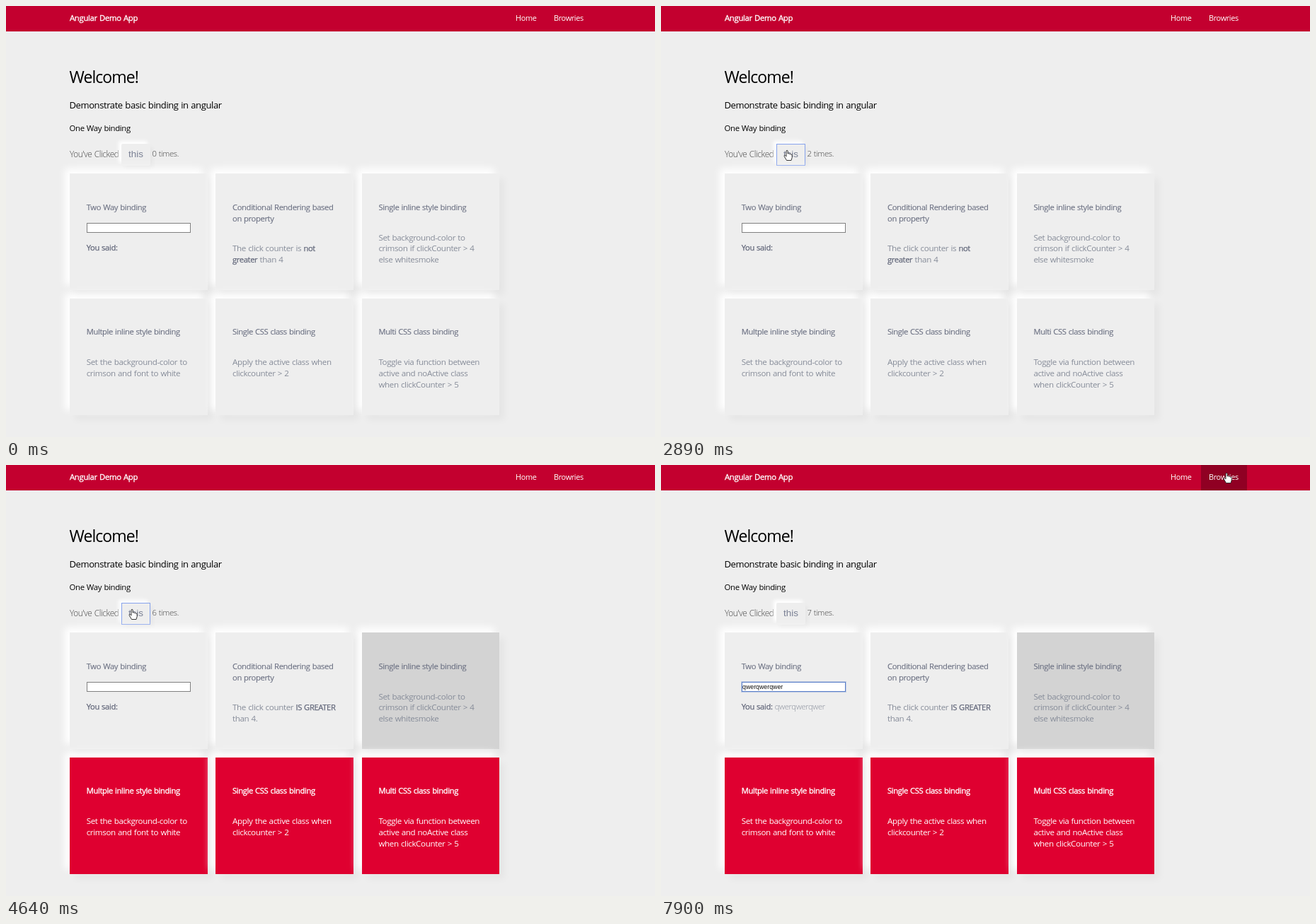
An HTML page for the animation above (8 s loop, 917x610 px).

```html
<!DOCTYPE html>
<html lang="en">
<head>
<meta charset="utf-8">
<title>Angular Demo App</title>
<style>
  html, body { margin: 0; width: 100%; height: 100%; overflow: hidden; background: #eee; }
  #stage {
    position: relative; width: 917px; height: 610px; overflow: hidden; background: #eee;
    font: 300 11.2px/16px "Open Sans", "Noto Sans", sans-serif;
    letter-spacing: -.031em; word-spacing: .05em; white-space: nowrap; color: #000;
  }
  #stage > *, .field, .said { position: absolute; }
  h1, h2, h3, h4, p { margin: 0; font-weight: 400; }
  h1, h2, h3, h4, p, b, span { letter-spacing: -.031em; word-spacing: .05em; }

  header { left: 0; top: 0; width: 917px; height: 36px; background: #c3002f; color: #fff; }
  header > * { position: absolute; top: 0; height: 27.3px; padding-top: 8.7px; font-weight: 400; }
  .brand { left: 90px; font-size: 11.4px; -webkit-text-stroke: .35px; }
  .home { left: 720px; font-size: 10.9px; }
  .link { left: 763px; width: 54px; padding-left: 11px; font-size: 10.9px; }
  .link.hover { background: #900023; }

  h1 { left: 89.5px; top: 92px; font-size: 23px; letter-spacing: -.04em; }
  h2 { left: 89.5px; top: 132.4px; font-size: 13px; }
  h3 { left: 89.5px; top: 164.6px; font-size: 11.4px; }
  .clicked { left: 90px; top: 200.7px; font-size: 11.8px; color: #444; }
  .times { left: 206.4px; top: 200.7px; font-size: 11.3px; color: #444; }
  .button {
    left: 163px; top: 195px; width: 41px; height: 31px; box-sizing: border-box; border-radius: 2px;
    font: 13.4px/30px Arial, "Liberation Sans", sans-serif; letter-spacing: 0;
    text-align: center; color: #7a8094; background: #eee;
    box-shadow: -4px -4px 5px #fff, 4px 4px 5px rgba(0,0,0,.03);
  }
  .button.focus { outline: 1px solid #86a2ec; outline-offset: -1px; border-radius: 0; }

  .card {
    width: 194.7px; height: 165px; box-sizing: border-box; padding: 39.8px 0 0 23.7px;
    line-height: 15.75px; color: #6c7183; background: #eee;
    box-shadow: -7px -7px 10px #fff, 7px 7px 10px rgba(0,0,0,.04);
  }
  .card h4 { font-size: 11.2px; margin-bottom: 27.1px; -webkit-text-stroke: .15px; }
  .card p { font-size: 11.6px; color: #868c99; }
  .card b { font-size: 11.2px; font-weight: 400; color: #62677a; -webkit-text-stroke: .25px; }
  .card.gray { background: #d3d3d3; }
  .card.active { background: #df0030; }
  .card.active h4, .card.active p { color: #fff; }
  .card.active h4 { -webkit-text-stroke: .35px; }

  .field {
    left: 24px; top: 70px; width: 147px; height: 14px; box-sizing: border-box;
    border: 1px solid #808080; background: #fff; color: #111;
    font: 8.8px/12px Arial, "Liberation Sans", sans-serif; letter-spacing: 0;
  }
  .field span { letter-spacing: 0; }
  .field.hover { border-color: #555; }
  .field.focus { border-color: #5a7fc9; box-shadow: 0 0 0 1px rgba(90,127,201,.3); }
  .caret { display: inline-block; width: 1px; height: 10px; background: #000; vertical-align: -2px; }
  .said { left: 23.7px; top: 96.7px; }
  .said span { color: #868c99; }
  #pointer { left: 0; top: 0; overflow: visible; }
</style>
</head>
<body>
<div id="stage">
  <header>
    <span class="brand">Angular Demo App</span>
    <span class="home">Home</span>
    <span class="link" id="link">Browries</span>
  </header>
  <h1>Welcome!</h1>
  <h2>Demonstrate basic binding in angular</h2>
  <h3>One Way binding</h3>
  <span class="clicked">You've Clicked</span>
  <span class="button" id="button">this</span>
  <span class="times"><span id="count">0</span> times.</span>

  <section class="card" style="left:90px;top:237px">
    <h4>Two Way binding</h4>
    <div class="field" id="field"><span id="typed"></span><i class="caret" id="caret"></i></div>
    <div class="said"><b>You said:</b> <span id="echo"></span></div>
  </section>
  <section class="card" style="left:296.3px;top:237px">
    <h4>Conditional Rendering based<br>on property</h4>
    <p id="small">The click counter is <b>not<br>greater</b> than 4</p>
    <p id="great">The click counter <b>IS GREATER</b><br>than 4.</p>
  </section>
  <section class="card" id="single" style="left:502.7px;top:237px">
    <h4>Single inline style binding</h4>
    <p>Set background-color to<br>crimson if clickCounter &gt; 4<br>else whitesmoke</p>
  </section>
  <section class="card" id="multiple" style="left:90px;top:413.7px">
    <h4>Multple inline style binding</h4>
    <p>Set the background-color to<br>crimson and font to white</p>
  </section>
  <section class="card" id="oneClass" style="left:296.3px;top:413.7px">
    <h4>Single CSS class binding</h4>
    <p>Apply the active class when<br>clickcounter &gt; 2</p>
  </section>
  <section class="card" id="manyClass" style="left:502.7px;top:413.7px">
    <h4>Multi CSS class binding</h4>
    <p>Toggle via function between<br>active and noActive class<br>when clickCounter &gt; 5</p>
  </section>

  <svg id="pointer" width="1" height="1">
    <g id="press">
      <circle r="8" fill="#000" opacity=".5"/>
      <circle r="7.2" fill="#fff" opacity=".5"/>
    </g>
    <path id="arrow" d="M.5 .5V11L2.9 8.8 4.4 12.3 6 11.6 4.5 8.2H7.8Z"
          fill="#fff" stroke="#222" stroke-width=".9"/>
    <path id="hand" d="M-1 1Q.2 -.5 1.2 1V5Q2.5 4.2 3.4 5.4 4.6 4.9 5.4 6 7.2 5.6 7.2 7.5V10.5L6 14.5H-.5L-3.9 8.6Q-4.2 7 -2.7 7.3L-1 9Z"
          fill="#fff" stroke="#222" stroke-width=".9"/>
    <path id="beam" d="M-2 -5.5H-.5L.5 -5 1.5 -5.5H3M.5 -5V5M-2 5.5H-.5L.5 5 1.5 5.5H3"
          fill="none" stroke="#222"/>
  </svg>
</div>
<script>
const LOOP = 8000;
const $ = id => document.getElementById(id);

// Pointer strokes: [ms, x, y]; the pointer rests between strokes.
const strokes = [
  [[400, 868, 628], [600, 690, 470], [800, 420, 300], [950, 272, 240], [1050, 240, 225],
   [1220, 219, 217], [1330, 206, 221], [1490, 178, 204]],
  [[5240, 178, 204], [5450, 186, 235], [5690, 199, 280], [5880, 205, 318]],
  [[6560, 205, 318], [6900, 386, 217], [7280, 691, 103], [7500, 785, 30], [7650, 799, 11]]
];
const presses = [[1670, 1770], [2230, 2350], [2730, 2890], [3360, 3520],
                 [3900, 4080], [4510, 4640], [5080, 5240], [6050, 6210]];
const counts = [1800, 2350, 2910, 3540, 4110, 4640, 5260];

// Zones: [left, top, right, bottom]
const BUTTON = [163, 195, 204, 226], LINK = [763, 0, 828, 36], FIELD = [114, 307, 261, 321];
const TEXTS = [[207, 201, 245, 219], [113, 277, 203, 293], FIELD];

const within = (t, a, b) => t >= a && t < b;
const inside = ([x, y], [l, u, r, d]) => within(x, l, r) && within(y, u, d);
const show = (id, on) => { $(id).style.display = on ? "" : "none"; };
const flag = (id, name, on) => $(id).classList.toggle(name, on);

function slope(pts, i, axis) {
  const a = pts[i - 1], b = pts[i + 1];
  return a && b ? (b[axis] - a[axis]) / (b[0] - a[0]) : 0;
}

function locate(t) {
  const pts = strokes.filter(s => s[0][0] <= t).pop() || strokes[0];
  const last = pts[pts.length - 1];
  if (t >= last[0]) return last.slice(1);
  const i = Math.max(0, pts.findIndex(p => p[0] > t) - 1);
  const p = pts[i], q = pts[i + 1], span = q[0] - p[0], u = (t - p[0]) / span;
  const ease = u * u * (3 - 2 * u);
  return [1, 2].map(k => Math.round(
    p[k] + (q[k] - p[k]) * ease
    + span * u * (1 - u) * ((1 - u) * slope(pts, i, k) - u * slope(pts, i + 1, k))));
}

function draw(t) {
  const count = counts.filter(c => c <= t).length;
  $("count").textContent = count;
  show("small", count < 5);
  show("great", count >= 5);
  flag("single", "gray", count >= 4);
  flag("multiple", "active", count >= 5);
  flag("oneClass", "active", count >= 3);
  flag("manyClass", "active", count >= 6);

  const letters = Math.min(12, Math.max(0, Math.floor((t - 6500) / 75) + 1));
  const text = "qwer".repeat(3).slice(0, letters);
  $("typed").textContent = $("echo").textContent = text;
  show("caret", within(t, 6050, 7900));
  flag("button", "focus", within(t, 1690, 6050));
  flag("field", "focus", t >= 6050);

  const at = locate(t), onLink = inside(at, LINK);
  const hand = onLink || inside(at, BUTTON);
  const beam = !hand && TEXTS.some(zone => inside(at, zone));
  flag("link", "hover", onLink);
  flag("field", "hover", inside(at, FIELD));
  show("pointer", t >= 430);
  show("press", presses.some(([a, b]) => within(t, a, b)));
  show("hand", hand);
  show("beam", beam);
  show("arrow", !hand && !beam);
  $("pointer").style.transform = `translate(${at[0]}px, ${at[1]}px)`;
}

const start = performance.now();
function tick() {
  draw((performance.now() - start) % LOOP);
  requestAnimationFrame(tick);
}
tick();
</script>
</body>
</html>
```
